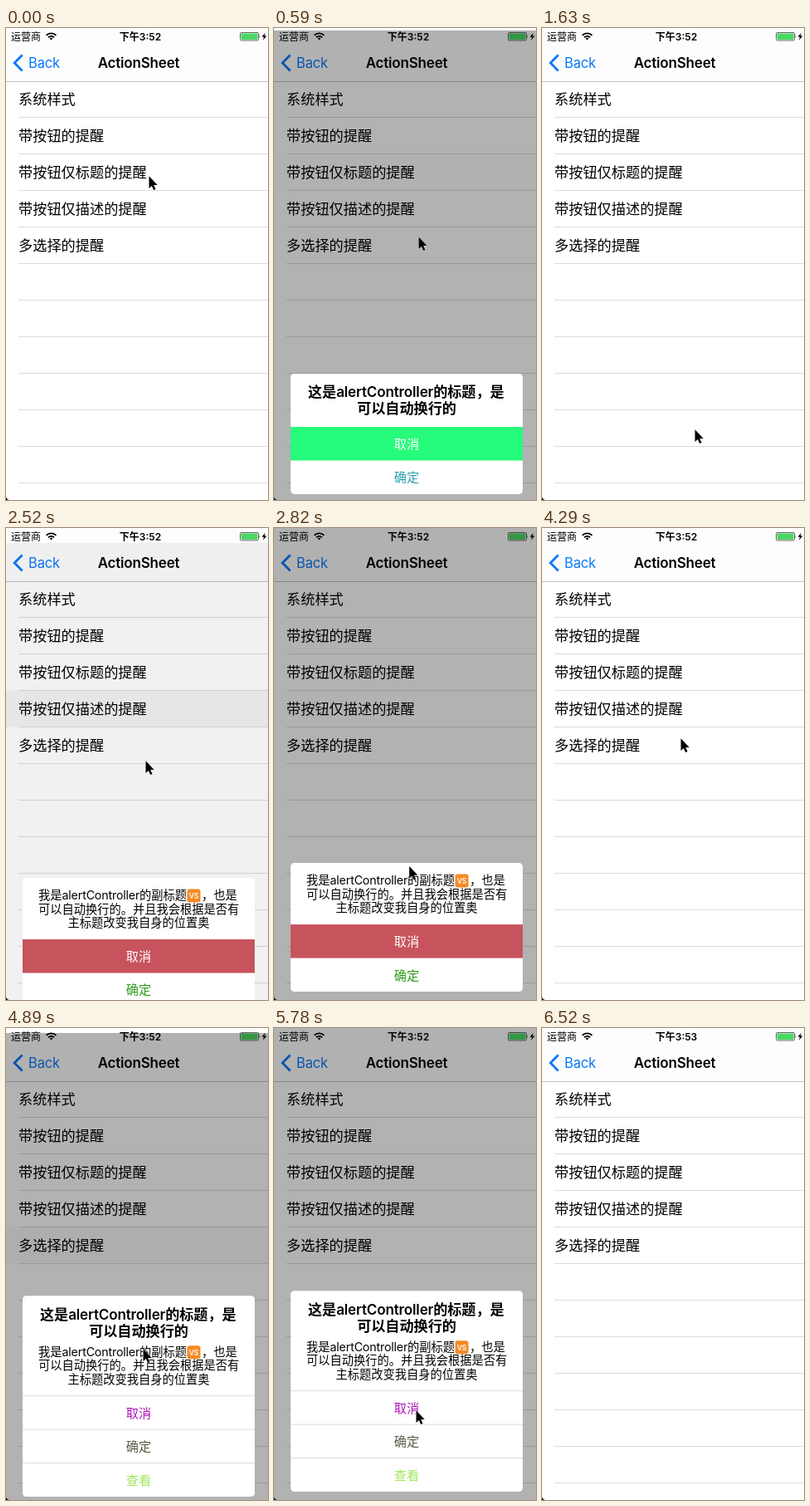
An HTML page that plays this animation: 316x568 px, repeating every 7.06 s.

```html
<!DOCTYPE html>
<html lang="zh-CN">
<head>
<meta charset="utf-8">
<style>
html, body { margin: 0; width: 100%; height: 100%; overflow: hidden; background: #fff; }
svg { display: block; width: 316px; height: 568px; }
text { font-family: Inter, "Noto Sans CJK SC", "Noto Sans CJK", sans-serif; white-space: pre; }
.mid { text-anchor: middle; }
.title { font-size: 17.1px; font-weight: 600; }
.sub { font-size: 14.25px; }
.latin { letter-spacing: -.18px; }
.btn { font-size: 15.2px; text-anchor: middle; }
</style>
</head>
<body>
<svg id="stage" viewBox="0 0 316 568" xmlns="http://www.w3.org/2000/svg">
  <rect width="316" height="568" fill="#fff"/>
  <rect width="316" height="64" fill="#fdfdfd"/>
  <rect id="glow" width="316" height="44" fill="#d9d9d9" opacity="0"/>
  <g id="list"></g>
  <rect y="64" width="316" height="1" fill="#c3c3c5"/>

  <text x="6" y="14.5" font-size="12">运营商</text>
  <g fill="none" stroke="#000" stroke-width="1.8">
    <path d="M48.6 8.9a8 8 0 0 1 11.8 0M51 11.3a4.8 4.8 0 0 1 7 0"/>
    <path d="M54.5 14.6l-1.9-2a2.7 2.7 0 0 1 3.8 0z" fill="#000" stroke="none"/>
  </g>
  <text id="clock" class="mid" x="162" y="14.5" font-size="12" font-weight="600"></text>
  <rect x="282.5" y="5.5" width="22" height="9.5" rx="1.5" fill="#fff" stroke="#555" stroke-width=".9"/>
  <rect x="283.6" y="6.6" width="19.8" height="7.3" rx=".6" fill="#4bd763"/>
  <path d="M305.4 8.6q1.6 1.6 0 3.4z" fill="#333"/>
  <path d="M312.6 5.8l-4 5h2.5l-1.2 4 4.5-5.3h-2.6z"/>

  <path d="M19.6 32.6L10.2 42l9.4 9.6" fill="none" stroke="#0b79fb" stroke-width="2.8"/>
  <text x="27" y="48" font-size="16.6" letter-spacing="-.2" fill="#0b79fb">Back</text>
  <text class="mid" x="160" y="48" font-size="17" font-weight="600" letter-spacing="-.2">ActionSheet</text>

  <g id="modal">
    <rect id="dim" width="316" height="568"/>
    <g id="sheets"></g>
  </g>
  <path d="M0 564q.6 3.4 4 4H0z"/>
  <path id="cursor" d="M.5 .3V15l3.3-3.1 2.3 5.2 2.4-1.1-2.3-5h4.5z" stroke="#fff" stroke-width="1" paint-order="stroke"/>
</svg>
<script>
const LOOP = 7060, STEP = 148.3, BOTTOM = 558, BTN_H = 40.45;
const $ = id => document.getElementById(id);

const label = (cls, x, y, s, extra = '') => `<text class="${cls}" x="${x}" y="${y}" ${extra}>${s}</text>`;

// Table rows and separators
const rows = ['系统样式', '带按钮的提醒', '带按钮仅标题的提醒', '带按钮仅描述的提醒', '多选择的提醒'];
let list = rows.map((s, i) => label('', 15, 92 + 44 * i, s, 'font-size="17.2"')).join('');
for (let i = 0; i < 11; i++) list += `<rect x="15" y="${107 + 44 * i}" width="301" height="1" fill="#dcdce0"/>`;
$('list').innerHTML = list;

// Sheet contents, y measured from the sheet top
const latin = '<tspan class="latin">alertController</tspan>';
const title = y =>
  label('title', 41, y, `这是${latin}的标题，是`) +
  label('title mid', 160, y + 20, '可以自动换行的');
const subtitle = y =>
  label('sub', 39, y, `我是${latin}的副标题`) +
  `<rect x="218.5" y="${y - 12.5}" width="16" height="16" rx="3" fill="#f58a25"/>` +
  label('mid', 226.5, y - 1, 'VS', 'font-size="8.5" font-weight="600" fill="#fff"') +
  label('sub', 236, y, '，也是') +
  label('sub', 39, y + 16.5, '可以自动换行的。并且我会根据是否有') +
  label('sub mid', 160, y + 33, '主标题改变我自身的位置奥');

const sheets = [
  { show: 188, hide: 1150, row: 2, head: 64, body: title(28),
    buttons: [['取消', '#fff', '#27fb7c'], ['确定', '#2a9fae']] },
  { show: 2231, hide: 3850, row: 3, head: 74, body: subtitle(26),
    buttons: [['取消', '#fff', '#c7535d'], ['确定', '#2b9a18']] },
  { show: 4534, hide: 6065, row: 4, head: 120.5, body: title(28.5) + subtitle(72.5), lines: true,
    buttons: [['取消', '#ae17b8'], ['确定', '#5a5a42'], ['查看', '#9fe75a']] }
];

function sheetMarkup({ head, body, buttons, lines }, i) {
  const height = head + BTN_H * buttons.length;
  const items = buttons.map(([s, color, fill], n) => {
    const y = head + BTN_H * n;
    return (fill ? `<rect x="20" y="${y}" width="280" height="${BTN_H}" fill="${fill}"/>` : '') +
      (lines ? `<rect x="20" y="${y - .5}" width="280" height="1" fill="#dcdcdc"/>` : '') +
      label('btn', 160, y + 26, s, `fill="${color}"`);
  }).join('');
  return `<g id="sheet${i}" transform="translate(0 ${BOTTOM - height})">
    <rect x="20" width="280" height="${height}" rx="4.5" fill="#fff"/>${body}${items}</g>`;
}
$('sheets').innerHTML = sheets.map(sheetMarkup).join('');

// Pointer stops: step, x, y
const path = [
  [0, 172, 178], [2, 172, 180], [4, 174, 251], [7, 184, 489], [10, 184, 489], [11, 184, 483],
  [13, 176, 310], [15, 168, 212], [16, 167, 222], [17, 168, 280], [20, 160, 470],
  [25, 153, 543], [26, 153, 540], [27, 157, 440], [29, 167, 253], [31, 167, 254],
  [32, 166, 300], [33, 165, 386], [38, 171, 458], [39, 171, 460], [41, 171, 460], [44, 230, 572]
];

const clamp = v => Math.max(0, Math.min(1, v));

function pointer(k) {
  const i = Math.max(1, path.findIndex(p => p[0] >= k));
  const [k0, x0, y0] = path[i - 1], [k1, x1, y1] = path[i];
  const u = (k - k0) / (k1 - k0);
  return [x0 + (x1 - x0) * u, y0 + (y1 - y0) * u];
}

// Critically damped spring, 1 to 0
const spring = ms => {
  const w = Math.max(0, ms) * .01826;
  return (1 + w) * Math.exp(-w);
};

function draw(ms) {
  const k = Math.floor((ms + 11) / STEP), t = k * STEP;
  let offset = 568, dim = 0, glow = 0;
  sheets.forEach((s, i) => {
    const age = t - s.show, gone = t - s.hide;
    const on = age >= 0 && gone < 700;
    $('sheet' + i).style.display = on ? '' : 'none';
    if (!on) return;
    offset = 568 * (gone < 0 ? spring(age) : 1 - spring(gone));
    dim = gone < 0 ? .3 * clamp((age - 275) / 80) : 0;
    glow = clamp(1 - age / 430);
    $('glow').setAttribute('y', 63.5 + 44 * s.row);
  });
  if (offset < 1.2) offset = 0;
  $('modal').setAttribute('transform', `translate(0 ${offset.toFixed(2)})`);
  $('dim').setAttribute('opacity', dim);
  $('glow').setAttribute('opacity', glow);
  $('clock').textContent = k < 42 ? '下午3:52' : '下午3:53';
  const shown = k < 44;
  $('cursor').style.display = shown ? '' : 'none';
  if (shown) $('cursor').setAttribute('transform', `translate(${pointer(k)})`);
}

const start = performance.now();
function tick() {
  draw((performance.now() - start) % LOOP);
  requestAnimationFrame(tick);
}
tick();
</script>
</body>
</html>
```
